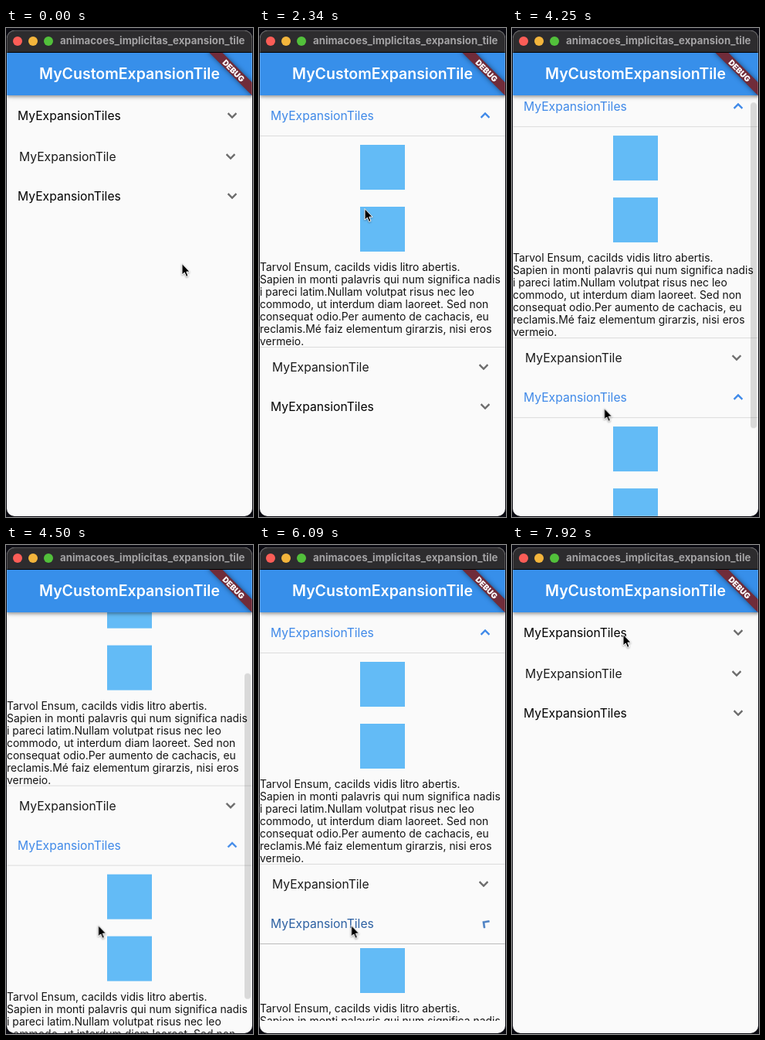
An HTML page that plays this animation: 320x632 px, repeating every 8 s.

```html
<!DOCTYPE html>
<html lang="pt">
<head>
<meta charset="utf-8">
<title>MyCustomExpansionTile</title>
<style>
@property --open { syntax: '<number>'; inherits: true; initial-value: 0; }
@property --turn { syntax: '<number>'; inherits: true; initial-value: 0; }
@property --scroll { syntax: '<number>'; inherits: true; initial-value: 0; }

html, body { margin: 0; width: 100%; height: 100%; overflow: hidden; background: #0b0b12; }
body { position: relative; font-family: Inter, Roboto, sans-serif; white-space: nowrap; }
.window, .window * { position: absolute; box-sizing: border-box; }
.window {
  left: 1px; top: 3px; width: 318px; height: 628px;
  border-radius: 10px; overflow: hidden; background: #fafafa;
}
.window::after {
  content: ''; position: absolute; inset: 0; border-radius: inherit;
  box-shadow: inset 0 0 0 1px rgb(255 255 255 / .2);
}
.titlebar {
  inset: 0 0 auto; height: 29px; background: #2d2c2e;
  border-bottom: 1px solid #000;
}
.titlebar i { top: 8px; width: 12px; height: 12px; border-radius: 50%; }
.titlebar span { left: 69px; top: 0; font: 700 13.25px/27px Inter, sans-serif; color: #a3a2a4; }

.app { inset: 28px 0 0; overflow: hidden; }
.appbar {
  inset: 0 0 auto; height: 56px; background: #378fea; color: #fff;
  font: 600 19.5px/56px Inter, sans-serif; text-align: center;
  box-shadow: 0 2px 4px rgb(0 0 0 / .32), 0 1px 8px rgb(0 0 0 / .14);
}
.banner {
  left: 254px; top: 18px; width: 80px; height: 12px; transform: rotate(45deg);
  background: #702c3a; box-shadow: 0 0 6px rgb(0 0 0 / .5);
  color: #fff; font: 900 10.2px/12px Inter, sans-serif; text-align: center;
}

/* List */
.view { inset: 56px 0 0; overflow: hidden; animation: scroll 8s infinite; }
.list { inset: 0; transform: translateY(calc(var(--scroll) * -1px)); }
.list .tile { position: relative; }
.head {
  --tint: calc(var(--turn) * 100%);
  inset: 0 0 auto; height: 52px; padding-left: 14px;
  font-size: 15.7px; line-height: 54px;
  color: color-mix(in srgb, #3f89e8 var(--tint), #000);
}
.head svg {
  left: 280px; top: 14px; width: 24px; height: 24px;
  --ink: color-mix(in srgb, #3f89e8 var(--tint), #6c6c6c);
  fill: var(--ink); stroke: var(--ink); stroke-width: .5;
  transform: rotate(calc(var(--turn) * 180deg));
}
.plain { height: 51px; }
.plain .head { padding-left: 16px; color: #1a1a1a; }
.plain svg { left: 278px; }
.fold { padding-top: 53px; }
.line {
  left: 0; right: 0; top: 52px; height: 1px;
  background: rgb(0 0 0 / calc(var(--turn) * (.12 + .8 * (1 - var(--turn)))));
}
.line.end { top: 100%; }
.fold .clip { position: relative; height: calc(var(--open) * 272px); overflow: hidden; }
.content { left: 0; top: calc((var(--open) - 1) * 136px); width: 318px; height: 272px; }
.content i { left: 130px; top: 11px; width: 58px; height: 58px; background: #63bbf6; }
.content i + i { top: 91px; }
.content p { left: 0; top: 161px; margin: 0; font-size: 13.95px; line-height: 16px; color: #141414; }
.thumb {
  right: 2px; top: 0; width: 8px; height: 421px; border-radius: 4px; background: rgb(0 0 0 / .13);
  transform: translateY(calc(var(--scroll) * .777px));
  animation: thumb 8s infinite linear;
}

.first { animation: open-first 8s infinite, turn-first 8s infinite; }
.last { animation: open-last 8s infinite, turn-last 8s infinite; }

.cursor {
  position: absolute; left: 0; top: 0; width: 16px; height: 24px; overflow: visible;
  filter: drop-shadow(0 1px 1px rgb(0 0 0 / .35));
  animation: cursor 8s infinite;
}

@keyframes open-first {
  0%, 20% { --open: 0; animation-timing-function: ease-in; }
  22.5%, 91.25% { --open: 1; animation-timing-function: ease-out; }
  93.75%, 100% { --open: 0; }
}
@keyframes turn-first {
  0%, 20% { --turn: 0; animation-timing-function: cubic-bezier(.3, .4, .7, 1); }
  22.5%, 91.25% { --turn: 1; animation-timing-function: cubic-bezier(.3, 0, .7, .6); }
  93.75%, 100% { --turn: 0; }
}
@keyframes open-last {
  0%, 44.35% { --open: 0; animation-timing-function: ease-in; }
  46.85%, 75% { --open: 1; animation-timing-function: ease-out; }
  77.5%, 100% { --open: 0; }
}
@keyframes turn-last {
  0%, 44.35% { --turn: 0; animation-timing-function: cubic-bezier(.3, .4, .7, 1); }
  46.85%, 75% { --turn: 1; animation-timing-function: cubic-bezier(.3, 0, .7, .6); }
  77.5%, 100% { --turn: 0; }
}
@keyframes scroll {
  0%, 51.9% { --scroll: 0; animation-timing-function: ease-in; }
  56.25% { --scroll: 101; animation-timing-function: ease-out; }
  59.4%, 62.5% { --scroll: 156; animation-timing-function: ease-in; }
  64.625% { --scroll: 115; animation-timing-function: ease-out; }
  69%, 100% { --scroll: 0; }
}
@keyframes thumb {
  0%, 52% { opacity: 0; }
  53%, 72% { opacity: 1; }
  74.5%, 100% { opacity: 0; }
}
@keyframes cursor {
  0%, 5% { transform: translate(228px, 304px); animation-timing-function: ease-in-out; }
  17%, 24% { transform: translate(145px, 114px); animation-timing-function: ease-in-out; }
  37.5%, 79% { transform: translate(119.5px, 491px); animation-timing-function: ease-in; }
  82.375% { transform: translate(109px, 371px); animation-timing-function: ease-out; }
  88%, 100% { transform: translate(144px, 115px); }
}
</style>
</head>
<body>
<div class="window">
  <div class="app">
    <div class="view">
      <div class="list">
        <div class="tile fold first">
          <div class="head">MyExpansionTiles</div>
          <div class="line"></div>
          <div class="clip">
            <div class="content">
              <i></i><i></i>
              <p>Tarvol Ensum, cacilds vidis litro abertis.<br>
                Sapien in monti palavris qui num significa nadis<br>
                i pareci latim.Nullam volutpat risus nec leo<br>
                commodo, ut interdum diam laoreet. Sed non<br>
                consequat odio.Per aumento de cachacis, eu<br>
                reclamis.Mé faiz elementum girarzis, nisi eros<br>
                vermeio.</p>
            </div>
          </div>
          <div class="line end"></div>
        </div>
        <div class="tile plain"><div class="head">MyExpansionTile</div></div>
        <div class="tile fold last">
          <div class="head">MyExpansionTiles</div>
          <div class="line"></div>
        </div>
      </div>
      <div class="thumb"></div>
    </div>
    <div class="appbar">MyCustomExpansionTile</div>
    <div class="banner">DEBUG</div>
  </div>
  <div class="titlebar">
    <i style="left:8px;background:#fb5d57"></i>
    <i style="left:28px;background:#f3b53c"></i>
    <i style="left:48px;background:#52c03b"></i>
    <span>animacoes_implicitas_expansion_tile</span>
  </div>
</div>
<svg class="cursor" viewBox="0 0 16 24">
  <path d="M0 .5V15L3.3 12 5.6 17.4 8 16.4 5.8 11.1H10.2Z" fill="#000" stroke="#fff" stroke-width="1" stroke-linejoin="round"/>
</svg>
<script>
const chevron = '<svg viewBox="0 0 24 24"><path d="M16.59 8.59 12 13.17 7.41 8.59 6 10l6 6 6-6z"/></svg>';
document.querySelectorAll('.head').forEach(head => head.insertAdjacentHTML('beforeend', chevron));

// Both folding tiles share the same content.
document.querySelector('.last').append(document.querySelector('.clip').cloneNode(true));
</script>
</body>
</html>
```
